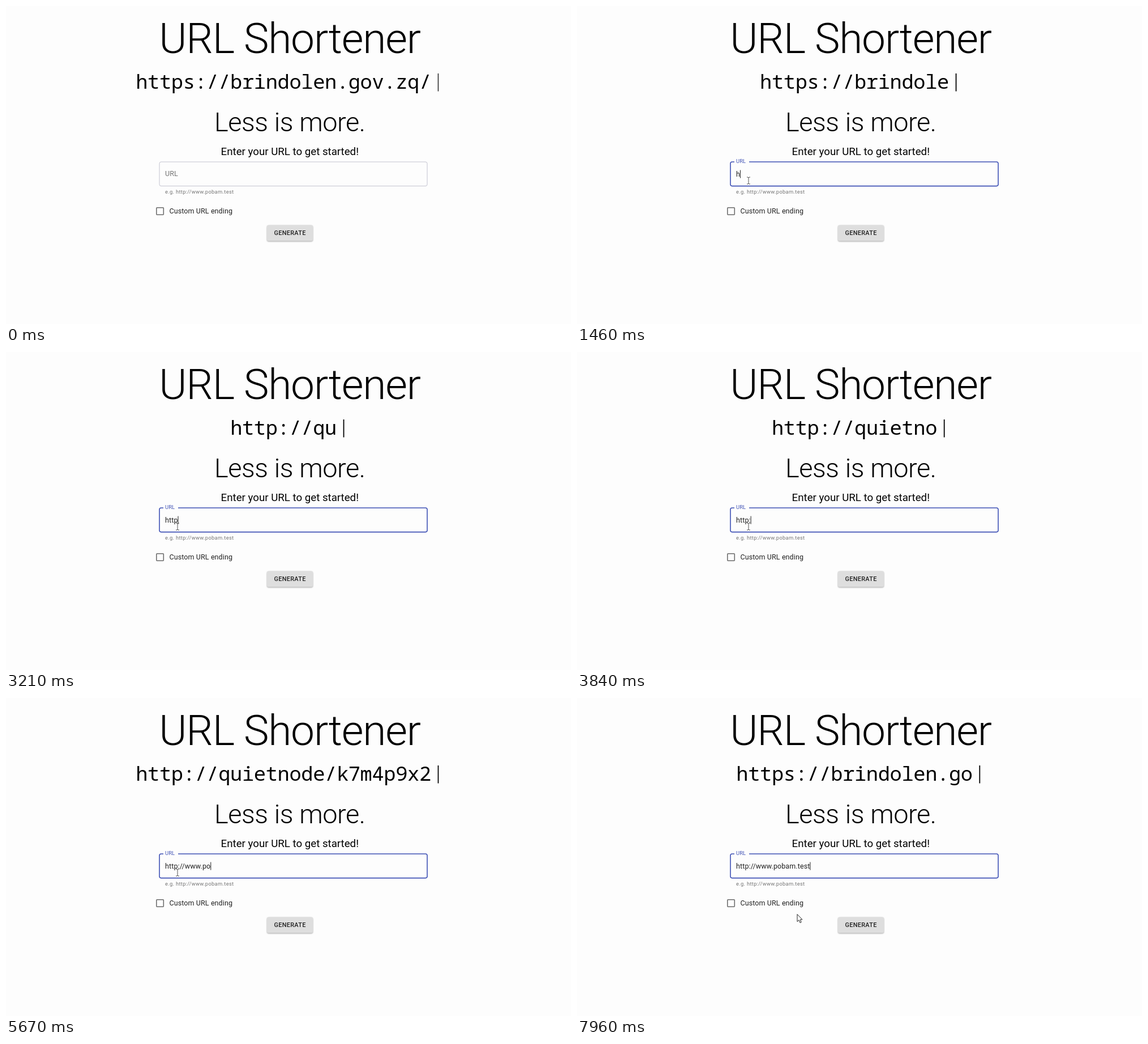
Recreate the animation shown at these times as an HTML page. Size 998 px wide and 561 px high, loop 8000 ms.

```html
<!DOCTYPE html>
<html lang="en">
<head>
<meta charset="utf-8">
<title>URL Shortener</title>
<style>
  html, body { margin: 0; width: 100%; height: 100%; overflow: hidden; background: #fdfdfd; }
  svg { display: block; width: 100%; height: 100%; font-family: Roboto, sans-serif; }
  .middle { text-anchor: middle; }
  .title { font-size: 74.85px; font-weight: 300; letter-spacing: -.01562em; }
  .tagline { font-size: 46.8px; font-weight: 300; letter-spacing: -.00833em; }
  .prompt { font-size: 18.7px; }
  .body { font-size: 12.48px; letter-spacing: .00938em; fill: #212121; }
  .hint { font-size: 9.36px; letter-spacing: .03333em; fill: #757575; }
  .button { font-size: 10.9px; font-weight: 500; letter-spacing: .02857em; fill: #212121; }
  .mono { font-family: "Noto Sans Mono", "DejaVu Sans Mono", monospace; font-size: 35.4px; letter-spacing: -.37px; }
  .raised { filter: drop-shadow(0 1.4px 1.2px rgba(0, 0, 0, .35)); }
</style>
</head>
<body>
<svg viewBox="0 0 998 561">
  <text class="title middle" x="501" y="83">URL Shortener</text>
  <text class="mono" id="headline" y="146"></text>
  <rect id="headlineCaret" y="119" width="1.8" height="31.5"/>
  <text class="tagline middle" x="501.3" y="220.5">Less is more.</text>
  <text class="prompt middle" x="501.3" y="262.5">Enter your URL to get started!</text>

  <rect id="outline" x="271" y="275" width="473" height="42.6" rx="3" fill="none"/>
  <rect id="notch" x="278" y="272" height="6" fill="#fdfdfd"/>
  <text class="body" id="label">URL</text>
  <text class="body" id="input" x="281" y="300.5"></text>
  <rect id="inputCaret" y="289.5" width="1" height="14" fill="#212121"/>
  <text class="hint" x="281" y="330.5">e.g. http://www.pobam.test</text>

  <rect x="265.8" y="355.8" width="12.5" height="12.5" rx="1" fill="none" stroke="#6b6b6b" stroke-width="1.56"/>
  <text class="body" x="288.5" y="366.3">Custom URL ending</text>

  <rect class="raised" x="461" y="386.5" width="81" height="28" rx="3" fill="#dedede"/>
  <text class="button middle" x="501.6" y="403.7">GENERATE</text>

  <path id="beam" d="M-3 -6H-1L0 -5L1 -6H3M0 -5V5M-3 6H-1L0 5L1 6H3" fill="none" stroke="#555"/>
  <path id="arrow" d="M0 0V13L3 10.2L5 15L7.2 14L5.2 9.4H9Z" fill="#fff" stroke="#222"/>
</svg>
<script>
const LOOP = 8000;
const SECURE_URL = "https://brindolen.gov.zq/";
const LOCAL_URL = "http://quietnode/k7m4p9x2";
const ENTERED_URL = "http://www.pobam.test";
const ADVANCE = 20.87;   // width of one headline character
const CENTER = 500.5;

// [time, visible characters]
const headlineKeys = [
  [0, 25], [1170, 25], [1960, 0], [2260, 0], [3820, 14], [4940, 25],
  [6120, 25], [6790, 4], [7000, 6], [7950, 20]
];
const inputKeys = [[1200, 0], [1450, 1], [2400, 3], [3800, 5], [5650, 13], [6700, 21]];
const headlineHolds = [[-120, 1170], [4940, 6120]];

const el = id => document.getElementById(id);
const set = (id, attrs) => {
  for (const name in attrs) el(id).setAttribute(name, attrs[name]);
};
const clamp01 = v => Math.max(0, Math.min(1, v));
const progress = (t, from, to) => clamp01((t - from) / (to - from));
const mix = (a, b, p) => a + (b - a) * p;
const smooth = p => p * p * (3 - 2 * p);

function countAt(keys, t) {
  const next = keys.findIndex(([time]) => time > t);
  if (next === 0) return keys[0][1];
  if (next < 0) return keys[keys.length - 1][1];
  const [t0, n0] = keys[next - 1], [t1, n1] = keys[next];
  return Math.round(mix(n0, n1, progress(t, t0, t1)));
}

function drawHeadline(t) {
  const count = countAt(headlineKeys, t);
  const url = t >= 2100 && t < 6790 ? LOCAL_URL : SECURE_URL;
  const left = CENTER - (count + 1) * ADVANCE / 2;
  el("headline").textContent = url.slice(0, count);
  set("headline", { x: left });

  const hold = headlineHolds.find(([from, to]) => t >= from && t < to);
  const opacity = hold ? .5 + .5 * Math.cos((t - hold[0]) / 700 * 2 * Math.PI) : 1;
  set("headlineCaret", { x: left + (count + .5) * ADVANCE + 1.2, opacity });
}

function drawField(t) {
  const focused = t >= 40;
  const float = 1 - (1 - progress(t, 40, 240)) ** 3;
  set("outline", {
    stroke: focused ? "#3f51b5" : "#c3c3d0",
    "stroke-width": focused ? 1.6 : 1
  });
  set("notch", { width: 26 * float });
  const color = [[117, 63], [117, 81], [117, 181]].map(([a, b]) => mix(a, b, float));
  el("label").style.fill = `rgb(${color})`;
  set("label", {
    transform: `translate(281 ${mix(300.3, 277.3, float)}) scale(${mix(1, .75, float)})`
  });

  const count = countAt(inputKeys, t);
  el("input").textContent = ENTERED_URL.slice(0, count);
  const textWidth = count ? el("input").getComputedTextLength() : 0;
  const blinkStart = t < 1200 ? 0 : 6700;
  const typing = t >= 1200 && t < 6700;
  const visible = focused && (typing || (t - blinkStart) % 1000 < 500);
  set("inputCaret", { x: 281 + textWidth, opacity: visible ? 1 : 0 });
}

function drawPointer(t) {
  const p = smooth(progress(t, 7600, 7950));
  const x = mix(303, 389, p), y = mix(308, 381.5, p);
  const overField = y < 318;
  const transform = `translate(${x} ${y})`;
  set("beam", { transform, opacity: t >= 40 && overField ? 1 : 0 });
  set("arrow", { transform, opacity: overField ? 0 : 1 });
}

const start = performance.now();
function frame() {
  const t = (performance.now() - start) % LOOP;
  drawHeadline(t);
  drawField(t);
  drawPointer(t);
  requestAnimationFrame(frame);
}
frame();
</script>
</body>
</html>
```
